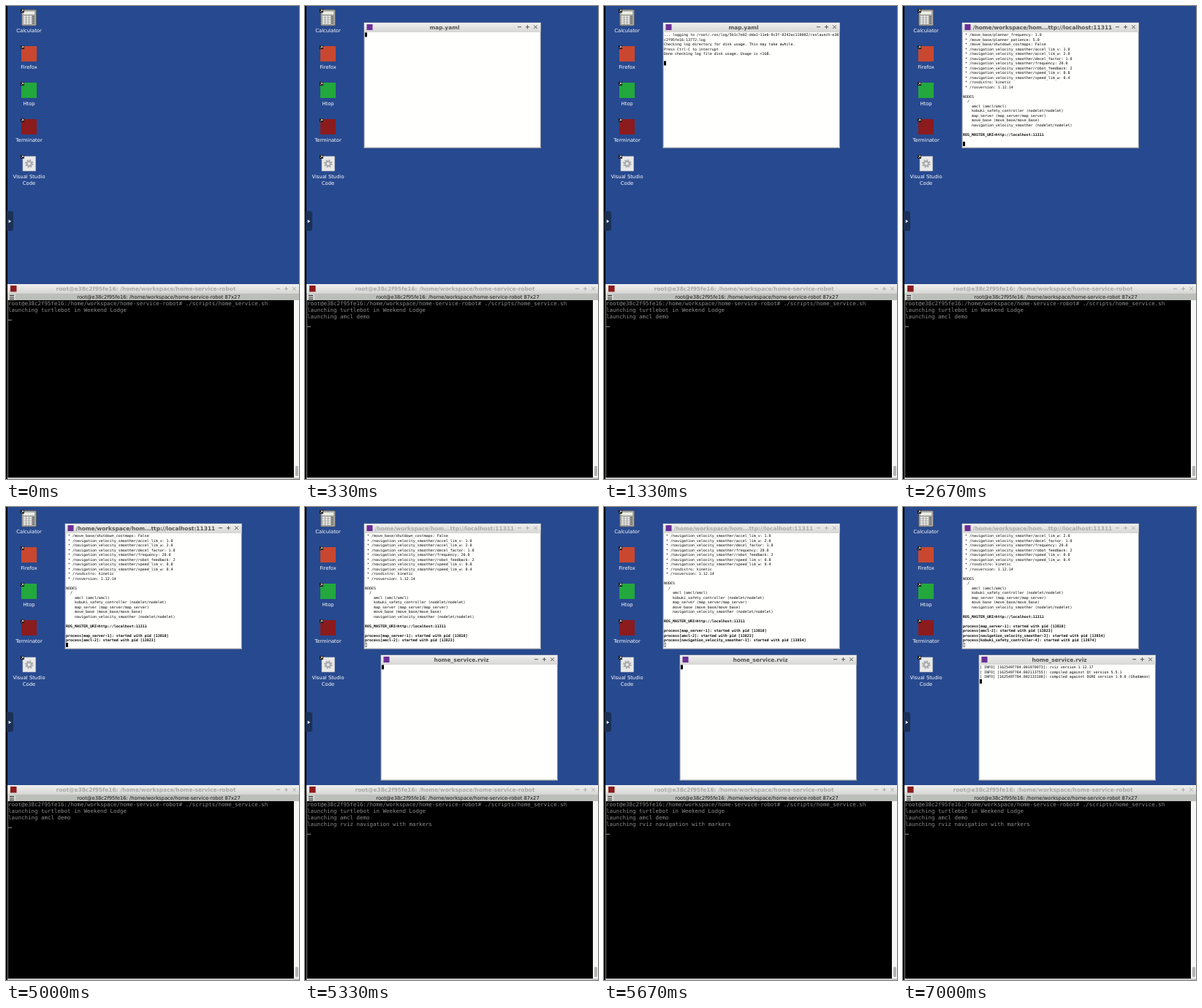
Animation of 401x648 px, one loop 8 s. Source, as an HTML page:

```html
<!DOCTYPE html>
<html lang="en">
<head>
<meta charset="utf-8">
<title>Robot launch desktop</title>
<style>
  html, body { margin: 0; width: 100%; height: 100%; overflow: hidden; background: #27498f; }
  svg { display: block; width: 100%; height: 100%; }
  text { white-space: pre; text-rendering: geometricPrecision; }
  .label { font: 6.8px "DejaVu Sans", sans-serif; fill: #fff; text-anchor: middle; }
  .title { font: bold 7.45px "DejaVu Sans", sans-serif; text-anchor: middle; }
  .bar { font: 6.77px "DejaVu Sans", sans-serif; fill: #161616; text-anchor: middle; }
  .shell { font: 7.47px "DejaVu Sans Mono", monospace; fill: #8c8c8c; }
  .xterm { font: 4.98px "DejaVu Sans Mono", monospace; fill: #000; }
  .bold { font-weight: bold; }
</style>
</head>
<body>
<svg id="stage" viewBox="0 0 401 648" preserveAspectRatio="none" xmlns="http://www.w3.org/2000/svg">
  <defs>
    <linearGradient id="chrome" x1="0" y1="0" x2="0" y2="1">
      <stop offset="0" stop-color="#f0f0ee"/>
      <stop offset="1" stop-color="#d6d6d4"/>
    </linearGradient>
  </defs>
  <g id="desktop"></g>
  <g id="windows"></g>
  <g id="terminal"></g>
</svg>
<script>
const LOOP = 8000;
const STEPS = [0, 330, 1330, 2670, 3670, 5000, 5330, 5670, 7000];
const HOST = "root@e38c2f95fe16";
const DIR = "/home/workspace/home-service-robot";
const ROWS = 24, ROW = 6.5, COL = 3;

const smoother = "/navigation_velocity_smoother/";
const summary = [
  ...["/move_base/planner_frequency: 1.0", "/move_base/planner_patience: 5.0",
    "/move_base/shutdown_costmaps: False",
    smoother + "accel_lim_v: 1.0", smoother + "accel_lim_w: 2.0",
    smoother + "decel_factor: 1.0", smoother + "frequency: 20.0",
    smoother + "robot_feedback: 2", smoother + "speed_lim_v: 0.8",
    smoother + "speed_lim_w: 0.4", "/rosdistro: kinetic", "/rosversion: 1.12.14"
  ].map(s => " * " + s),
  "", "NODES", "  /",
  ...["amcl (amcl/amcl)", "kobuki_safety_controller (nodelet/nodelet)",
    "map_server (map_server/map_server)", "move_base (move_base/move_base)",
    "navigation_velocity_smoother (nodelet/nodelet)"].map(s => "    " + s),
  "", "*ROS_MASTER_URI=http://localhost:11311", ""
];
const started = (name, pid) => [`*process[${name}]: started with pid [${pid}]`];
const info = (stamp, s) => `[ INFO] [1625497784.${stamp}]: ${s}`;

// Each output is [time, lines]; a leading * marks a bold line.
const launchLog = [
  [1330, ["... logging to /root/.ros/log/5b1c7e02-dda1-11eb-9c3f-0242ac110002/roslaunch-e38",
    "c2f95fe16-13772.log",
    "Checking log directory for disk usage. This may take awhile.",
    "Press Ctrl-C to interrupt",
    "Done checking log file disk usage. Usage is <1GB.", ""]],
  [2670, summary],
  [3670, started("map_server-1", 13810)],
  [5000, started("amcl-2", 13823)],
  [5670, started("navigation_velocity_smoother-3", 13854)],
  [7000, started("kobuki_safety_controller-4", 13974)]
];
const rvizLog = [
  [7000, [info("001970073", "rviz version 1.12.17"),
    info("002113755", "compiled against Qt version 5.5.1"),
    info("002133108", "compiled against OGRE version 1.9.0 (Ghadamon)")]]
];
const shellLog = [
  [0, [`${HOST}:${DIR}# ./scripts/home_service.sh`, "launching turtlebot in Weekend Lodge"]],
  [330, ["launching amcl demo"]],
  [5330, ["launching rviz navigation with markers"]]
];

const linesAt = (log, t) => log.filter(([at]) => at <= t).flatMap(([, lines]) => lines);
const escape = s => s.replace(/&/g, "&amp;").replace(/</g, "&lt;");
const text = (cls, x, y, s, extra = "") => `<text class="${cls}" x="${x}" y="${y}" ${extra}>${escape(s)}</text>`;
const rect = (x, y, w, h, fill, extra = "") =>
  `<rect x="${x}" y="${y}" width="${w}" height="${h}" fill="${fill}" ${extra}/>`;
const stroke = (d, color, width = 1) => `<path d="${d}" fill="none" stroke="${color}" stroke-width="${width}"/>`;

// Minimise, maximise and close signs around the middle one.
const buttons = (x, y, color) => stroke(
  `M${x - 13.5} ${y}h5M${x - 2.5} ${y}h5M${x} ${y - 2.5}v5` +
  `M${x + 8.7} ${y - 2.3}l4.6 4.6m0 -4.6l-4.6 4.6`, color);

function xterm(dx, dy, title, lines, focused) {
  const ink = focused ? "#555" : "#aaa";
  const shown = lines.slice(1 - ROWS);
  const top = 36.4 + shown.length * ROW;
  const cursor = focused
    ? rect(82, top, COL, 6, "#000")
    : rect(82.3, top + .3, COL - .6, 5.4, "none", 'stroke="#444" stroke-width=".6"');
  const body = shown.map((line, i) => {
    const bold = line[0] === "*";
    return text(bold ? "xterm bold" : "xterm", 82, 41.2 + i * ROW, bold ? line.slice(1) : line);
  }).join("");
  return `<g transform="translate(${dx} ${dy})">` +
    rect(80.5, 22.5, 242.5, 172.5, "#8b93a3") +
    rect(81, 23, 241.5, 13, "url(#chrome)") +
    rect(81.5, 36, 240.5, 157, "#fffffd") +
    rect(81, 193, 241.5, 1, "#d8d8d8") +
    rect(84.5, 25, 8, 8, "#6b2f96") +
    text("title", 191, 31.7, title, `fill="${ink}"`) +
    buttons(304.5, 28.7, ink) + body + cursor + "</g>";
}

function desktop() {
  const badge = y => rect(20, y, 5, 5, "#111") +
    stroke(`M21 ${y + 4}l2.6 -2.6M21.5 ${y + 1.2}h2.3v2.3`, "#fff", .8);
  let keys = "";
  for (let r = 0; r < 4; r++)
    for (let c = 0; c < 4; c++)
      keys += rect(24 + c * 4, 13.5 + r * 3, 3, 2, c === 3 ? "#777" : "#f2f2f2");
  const calculator = rect(21.5, 5, 20, 22, "#a4a4a0", 'rx="1.5" stroke="#555" stroke-width=".7"') +
    rect(24, 7.5, 15, 4, "#eef0e6") + keys;
  const page = rect(23, 206, 17.5, 20, "#e9e9e9", 'stroke="#c4c4c4" stroke-width=".6"') +
    '<circle cx="31.7" cy="216" r="4.8" fill="none" stroke="#a9aaac" stroke-width="2" stroke-dasharray="1.885"/>' +
    '<circle cx="31.7" cy="216" r="3.2" fill="none" stroke="#a9aaac" stroke-width="2.2"/>';
  const labels = ["Calculator", "Firefox", "Htop", "Terminator", "Visual Studio"]
    .map((s, i) => text("label", 31.5, 36.3 + 50 * i, s)).join("");
  return rect(0, 0, 401, 648, "#27498f") + rect(0, 0, 2, 648, "#05070b") +
    calculator +
    rect(21, 55, 21, 21, "#c9472f") +
    rect(21, 105, 21, 21, "#22a83c") +
    rect(21, 155, 21, 21, "#8c1b1d") +
    page + [4, 54, 104, 154, 204].map(badge).join("") +
    labels + text("label", 31.5, 244.8, "Code") +
    '<path d="M1 281h6q3 0 3 3v21q0 3 -3 3h-6z" fill="#1c3158"/>' +
    '<path d="M3.7 292.7v4.6l3.4 -2.3z" fill="#fff"/>';
}

function terminal(t) {
  const lines = linesAt(shellLog, t);
  return rect(2, 381, 399, 13, "url(#chrome)") +
    rect(6, 383, 8.5, 8.5, "#8c1b1d") +
    text("title", 191.5, 390.2, `${HOST}: ${DIR}`, 'fill="#a9a9a9"') +
    buttons(383.5, 387.3, "#aaa") +
    rect(2, 394, 399, 9, "#bcbeba") + rect(3, 394.5, 10, 8.5, "#d4d6d2") +
    stroke("M5 396.5h6M5 399h6M5 401.5h6", "#222") +
    text("bar", 209, 401, `${HOST}: ${DIR} 87x27`) +
    rect(2, 403, 392, 243, "#000") + rect(2, 403, 1, 243, "#777") +
    rect(394, 403, 7, 243, "#f6f6f4") + rect(396, 630, 4, 14, "#b3b3b1", 'rx="1.5"') +
    rect(2, 646, 399, 2, "#c6c6c4") +
    lines.map((s, i) => text("shell", 3, 410.3 + 9 * i, s)).join("") +
    rect(3, 411.7 + 9 * lines.length, 5, 1, "#9a9a9a");
}

function windows(t) {
  if (t < 330) return "";
  const title = t < 2670 ? "map.yaml" : "/home/workspace/hom...ttp://localhost:11311";
  const rvizOpen = t >= 5330;
  return xterm(0, 0, title, linesAt(launchLog, t), !rvizOpen) +
    (rvizOpen ? xterm(23, 180, "home_service.rviz", linesAt(rvizLog, t), true) : "");
}

const layer = id => document.getElementById(id);
layer("desktop").innerHTML = desktop();
let current = -1;
function draw() {
  const now = performance.now() % LOOP;
  const step = STEPS.filter(at => at <= now).pop();
  if (step !== current) {
    current = step;
    layer("windows").innerHTML = windows(step);
    layer("terminal").innerHTML = terminal(step);
  }
  requestAnimationFrame(draw);
}
draw();
</script>
</body>
</html>
```
